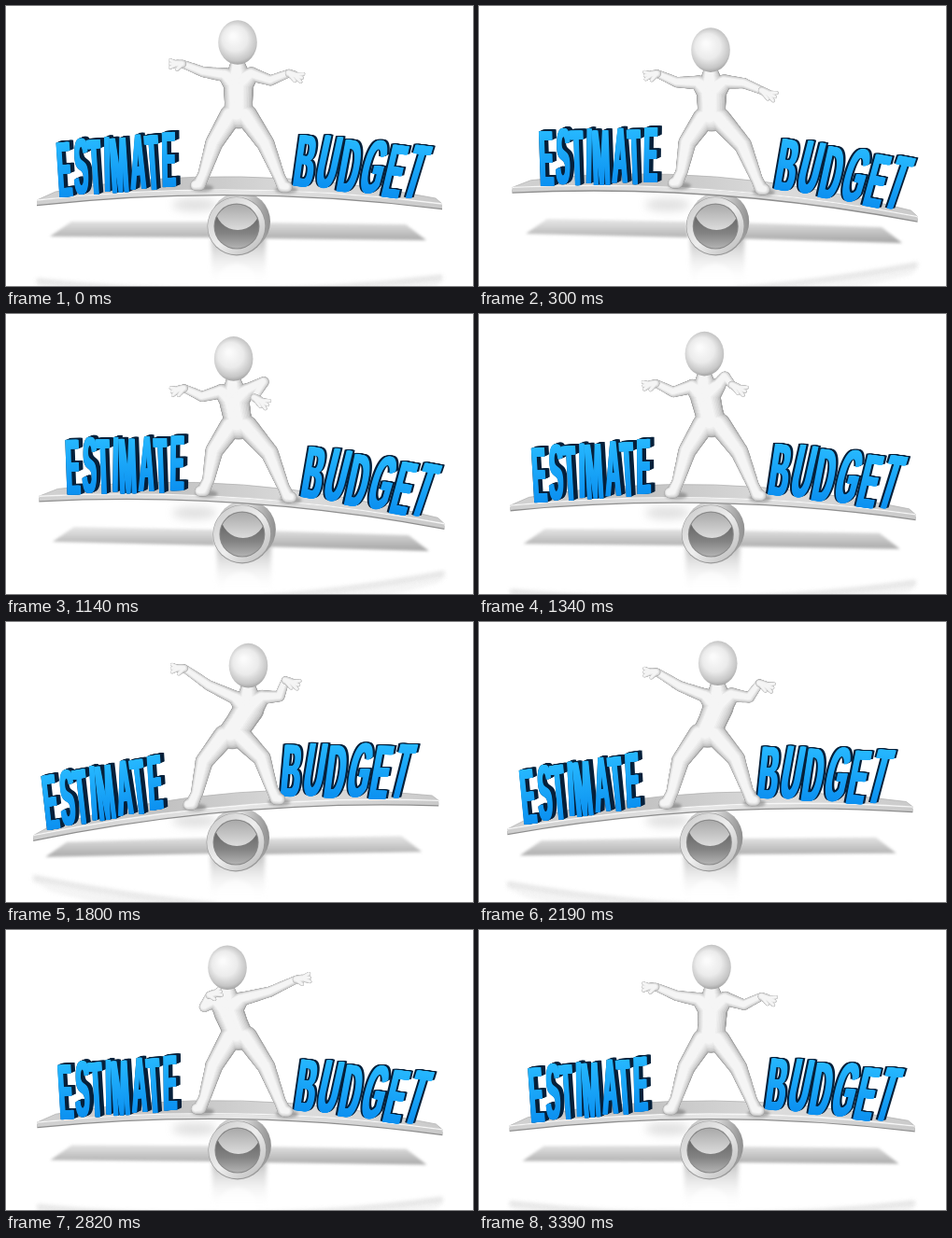
An HTML page with a canvas that plays this animation: 500x300 px, repeating every 3500 ms.

```html
<!DOCTYPE html>
<html lang="en">
<head>
<meta charset="utf-8">
<title>Estimate and budget in balance</title>
<style>
  html, body { margin: 0; width: 100%; height: 100%; overflow: hidden; background: #fff; }
  canvas { display: block; width: 500px; height: 300px; }
</style>
</head>
<body>
<canvas id="stage"></canvas>
<script>
const LOOP = 3500;
// Runs of equally long steps: [count, duration in ms].
const RUNS = [[3, 100], [4, 150], [4, 110], [1, 100], [2, 110], [1, 140], [1, 150],
  [4, 110], [2, 100], [1, 110], [3, 120], [4, 110]];
const FONT_SIZE = 100, CAP = 72;

const canvas = document.getElementById("stage");
const ctx = canvas.getContext("2d");
const ratio = window.devicePixelRatio || 1;
canvas.width = 500 * ratio;
canvas.height = 300 * ratio;

const mix = (a, b, u) => a + (b - a) * u;
const mixPoint = (p, q, u) => p.map((v, i) => mix(v, q[i], u));
const shift = ([x, y], dx, dy) => [x + dx, y + dy];

// One half sine between two times, zero elsewhere.
const wave = (t, from, to) => t > from && t < to ? Math.sin(Math.PI * (t - from) / (to - from)) : 0;

// 1 is right side down, -1 is left side down.
const tiltAt = t => wave(t, 0, 1400) - wave(t, 1400, 2390)
  + .14 * (wave(t, 2390, 2945) - wave(t, 2945, LOOP));

// Where a point of the level scene goes when the board tilts.
const sway = ([x, y], tilt, slide) => [x + slide * tilt, y + .1 * (x - 250) * tilt];

function gradient(x0, y0, x1, y1, ...colors) {
  const g = ctx.createLinearGradient(x0, y0, x1, y1);
  colors.forEach((c, i) => g.addColorStop(i / (colors.length - 1), c));
  return g;
}

function disc(x, y, rx, fill, ry = rx) {
  ctx.fillStyle = fill;
  ctx.beginPath();
  ctx.ellipse(x, y, rx, ry, 0, 0, Math.PI * 2);
  ctx.fill();
}

function polygon(points, fill) {
  ctx.fillStyle = fill;
  ctx.beginPath();
  points.forEach(p => ctx.lineTo(...p));
  ctx.closePath();
  ctx.fill();
}

function blurred(radius, paint) {
  ctx.save();
  ctx.filter = `blur(${radius * ratio}px)`;
  paint();
  ctx.restore();
}

function drawGround(tilt) {
  const dx = tilt * 5, rise = tilt * 5;
  const shade = gradient(0, 226, 0, 254, "rgba(120,120,120,.12)", "rgba(120,120,120,.68)");
  blurred(1.8, () => {
    polygon([[70 + dx, 231 - rise], [222, 231], [224, 248], [47 + dx, 247 - rise]], shade);
    polygon([[274, 232], [428 + dx, 234 + rise], [450 + dx, 251 + rise], [272, 249]], shade);
  });
  blurred(5, () => disc(202, 213, 24, "rgba(120,120,120,.22)", 7));
  // Faint reflection of the board in the floor.
  blurred(2, () => {
    ctx.globalAlpha = .2;
    ctx.translate(0, 506);
    ctx.scale(1, -1);
    drawBoard(tilt);
  });
}

function drawTube(tilt) {
  const x = 247 + (tilt > 0 ? tilt * 10 : tilt), y = 236;
  blurred(2, () => {
    ctx.fillStyle = gradient(0, 248, 0, 298, "rgba(130,130,130,.55)", "rgba(190,190,190,.25)", "rgba(255,255,255,0)");
    ctx.fillRect(x - 27, 248, 58, 50);
    disc(x, 298, 22, "rgba(255,255,255,.6)");
  });
  disc(x + 4, y - 5, 32, gradient(x - 28, 0, x + 36, 0, "#b8b8b8", "#e2e2e2", "#8f8f8f"));
  disc(x, y, 31.5, "#999");
  disc(x - .3, y - .3, 30.6, gradient(x - 25, y - 25, x + 25, y + 25, "#cfcfcf", "#eee", "#c0c0c0"));
  disc(x, y, 24.5, "#8a8a8a");
  // Dark floor inside the tube, bright far opening above it.
  ctx.save();
  ctx.beginPath();
  ctx.arc(x, y, 23.5, 0, Math.PI * 2);
  ctx.clip();
  ctx.fillStyle = gradient(0, y - 8, 0, y + 24, "#6c6c6c", "#848484", "#b4b4b4");
  ctx.fillRect(x - 25, y - 25, 50, 50);
  disc(x + 1, y - 20, 24, gradient(0, y - 24, 0, y + 4, "#a8a8a8", "#dcdcdc"));
  ctx.restore();
}

function drawBoard(tilt) {
  const place = (x, y) => sway([x, y], tilt, 4);
  const bend = (l, m, r) => m.map((v, i) => 2 * v - (l[i] + r[i]) / 2);
  const frontL = place(33, 208), frontR = place(467, 212);
  const backL = place(53, 199), backR = place(460, 206);
  const front = bend(frontL, place(250, 197), frontR);
  const back = bend(backL, place(252, 183), backR);
  const edge = dy => {
    ctx.beginPath();
    ctx.moveTo(...shift(frontL, 0, dy));
    ctx.quadraticCurveTo(...shift(front, 0, dy), ...shift(frontR, 0, dy));
  };
  const lip = (top, bottom, fill) => {
    edge(top);
    ctx.lineTo(...shift(frontR, 0, bottom));
    ctx.quadraticCurveTo(...shift(front, 0, bottom), ...shift(frontL, 0, bottom));
    ctx.fillStyle = fill;
    ctx.fill();
  };
  lip(2, 6.3, "#8e8e8e");
  lip(0, 5, gradient(34, 0, 467, 0, "#cfcfcf", "#e6e6e6", "#c9c9c9"));
  edge(0);
  ctx.lineTo(...backR);
  ctx.quadraticCurveTo(...back, ...backL);
  ctx.closePath();
  ctx.fillStyle = gradient(34, 0, 467, 0, "#d2d2d2", "#c3c3c3", "#dcdcdc", "#cacaca");
  ctx.fill();
  ctx.strokeStyle = "#b4b4b4";
  ctx.lineWidth = .8;
  ctx.stroke();
  edge(0);
  ctx.strokeStyle = "#f6f6f6";
  ctx.lineWidth = 1.3;
  ctx.stroke();
}

// Sets each letter on the slanted plane spanned by the word's four corners.
function drawWord(text, tilt, corners, depthFrom, depthTo) {
  const [bl, br, tl, tr] = corners.map((p, i) => sway(p, tilt, i < 2 ? 14 : 17));
  ctx.font = `bold ${FONT_SIZE}px "Liberation Sans", Arial, sans-serif`;
  const widths = [...text].map(c => ctx.measureText(c).width + 9);
  const total = widths.reduce((a, b) => a + b);

  const letters = (dx, dy, fill) => {
    let x = 0;
    ctx.fillStyle = fill;
    [...text].forEach((char, i) => {
      const u = x / total, v = (x + widths[i]) / total;
      const p = mixPoint(bl, br, u), q = mixPoint(bl, br, v), top = mixPoint(tl, tr, u);
      const odd = i % 2;
      ctx.save();
      ctx.translate(dx, dy + (odd ? -1 : 1));
      ctx.transform((q[0] - p[0]) / widths[i], (q[1] - p[1]) / widths[i],
        (p[0] - top[0] - 3 * odd) / CAP, (p[1] - top[1]) / CAP, p[0], p[1]);
      ctx.fillText(char, 4.5, 0);
      ctx.restore();
      x += widths[i];
    });
  };
  for (let u = 0; u <= 1; u += .2) {
    const [dx, dy] = mixPoint(depthFrom, depthTo, u);
    for (const w of [-1.1, 0, 1.1]) letters(dx + w, dy, "#06203a");
  }
  const face = gradient(0, 0, 0, CAP, "#0b8ff0", "#0b8ff0");
  face.addColorStop(0, "#0b8ff0");
  const blue = ctx.createLinearGradient(0, -CAP, 0, 0);
  blue.addColorStop(0, "#27b9ff");
  blue.addColorStop(1, "#0b90f0");
  for (const w of [-1.2, -.6, 0, .6, 1.2]) letters(w, 0, blue);
}

// Discs along a chain of [point, radius] pairs.
function chain(...nodes) {
  const discs = [];
  for (let i = 1; i < nodes.length; i++) {
    const [p, r] = nodes[i - 1], [q, s] = nodes[i];
    const count = Math.ceil(Math.hypot(q[0] - p[0], q[1] - p[1])) + 1;
    for (let k = 0; k <= count; k++) discs.push([...mixPoint(p, q, k / count), mix(r, s, k / count)]);
  }
  return discs;
}

function drawSolid(discs) {
  const layers = 8;
  for (let k = 0; k < layers; k++) {
    const u = k / (layers - 1), tone = Math.round(mix(164, 245, Math.sqrt(u)));
    for (const [x, y, r] of discs) {
      disc(x - r * .16 * u, y - r * .1 * u, r * (1 - .55 * u), `rgb(${tone},${tone},${tone})`);
    }
  }
}

// Middle joint of a limb, pushed sideways from the line between its ends.
function joint(from, to, bend) {
  const dx = to[0] - from[0], dy = to[1] - from[1], length = Math.hypot(dx, dy) || 1;
  return shift(mixPoint(from, to, .5), -dy / length * bend, dx / length * bend);
}

function elbow(shoulder, hand, side, amount) {
  const half = Math.hypot(hand[0] - shoulder[0], hand[1] - shoulder[1]) / 2;
  const slack = Math.sqrt(Math.max(25, 24 ** 2 - half ** 2));
  return joint(shoulder, hand, side * amount * slack);
}

function drawHand(wrist, tip) {
  const dx = tip[0] - wrist[0], dy = tip[1] - wrist[1];
  const palm = mixPoint(wrist, tip, .45);
  const fingers = [-.3, 0, .3].flatMap(s => chain([palm, 3.2], [shift(tip, -dy * s, dx * s), 1.9]));
  const thumb = chain([wrist, 3], [shift(palm, 0, 6), 1.9]);
  drawSolid([...chain([wrist, 4.2], [palm, 4.4]), ...fingers, ...thumb]);
}

function poseAt(t, tilt) {
  const right = Math.max(0, tilt), left = Math.max(0, -tilt);
  const reach = wave(t, 0, 1700), tuck = wave(t, 500, 1760);
  const cross = wave(t, 2300, 3250), dip = wave(t, 2200, 2800);
  const head = [
    248 + 12 * left - 7 * wave(t, 1000, 1560) - 11 * wave(t, 2500, 3140),
    39 + 13 * right + 8 * left + 2 * wave(t, 1000, 1560) - 5 * dip
  ];
  const hips = [249 - 7 * left, 116 + 5 * (left + right) - 3 * cross];
  const handL = [189 + 3 * right + 2 * left + 29 * cross, 62 + 20 * reach - 13 * left + 8 * cross + 9 * dip];
  const handR = [303 - 37 * tuck - 4 * left + 8 * cross, 72 + 30 * right - 10 * left - 22 * cross];
  return {
    head, hips, handL, handR,
    tipL: shift(handL, -13 + 26 * cross ** 4, 4 * reach + 5 * dip - 4 * cross ** 4),
    tipR: shift(handR, 14, 5 + 3 * reach - 7 * cross),
    bendR: .55 - 1.55 * reach
  };
}

function drawFigure(t, tilt) {
  const { head, hips, handL, handR, tipL, tipR, bendR } = poseAt(t, tilt);
  const neck = shift(head, 0, 24), chest = shift(head, 1, 46);
  const shoulderL = shift(head, -13, 35), shoulderR = shift(head, 15, 34);

  const leg = side => {
    const ankle = sway([252 + side * 40, 181 + side], tilt, 8);
    const toe = shift(ankle, side * 5, 11);
    const hip = shift(hips, side * 8, 1);
    const knee = joint(hip, ankle, -side * (4 + 4 * Math.abs(tilt)));
    blurred(1.5, () => disc(toe[0] + 3, toe[1] + 4, 12, "rgba(90,90,90,.45)", 4));
    return [
      ...chain([hip, 12], [knee, 9.5], [ankle, 6.5]),
      ...chain([ankle, 6.2], [toe, 7], [shift(toe, side * 4, 1), 5.8])
    ];
  };
  const arm = (shoulder, hand, side, bend) =>
    chain([shoulder, 7.5], [elbow(shoulder, hand, side, bend), 5.6], [hand, 4.2]);

  drawSolid([
    ...leg(-1), ...leg(1),
    ...chain([neck, 8], [chest, 16], [mixPoint(chest, hips, .6), 15], [hips, 15.5]),
    ...chain([shoulderL, 7.8], [chest, 15], [shoulderR, 7.8]),
    ...arm(shoulderL, handL, -1, .55), ...arm(shoulderR, handR, 1, bendR)
  ]);
  drawHand(handL, tipL);
  drawHand(handR, tipR);

  const [x, y] = head;
  const ball = ctx.createRadialGradient(x - 5, y - 7, 2, x - 1, y - 1, 25);
  ball.addColorStop(0, "#fbfbfb");
  ball.addColorStop(.5, "#ebebeb");
  ball.addColorStop(.85, "#c6c6c6");
  ball.addColorStop(1, "#a2a2a2");
  disc(x, y, 20.8, ball, 23.8);
}

function draw(t) {
  const tilt = tiltAt(t);
  ctx.setTransform(ratio, 0, 0, ratio, 0, 0);
  ctx.fillStyle = "#fff";
  ctx.fillRect(0, 0, 500, 300);
  drawGround(tilt);
  drawTube(tilt);
  drawBoard(tilt);
  drawWord("ESTIMATE", tilt, [[56, 204], [183, 194], [52, 143], [179, 133]], [0, 0], [4.5, -2]);
  drawWord("BUDGET", tilt, [[305, 191], [441, 208], [313, 134], [457, 149]], [-2, -1], [2.5, -1]);
  drawFigure(t, tilt);
}

const steps = [0];
for (const [count, duration] of RUNS) {
  for (let i = 0; i < count; i++) steps.push(steps[steps.length - 1] + duration);
}
steps.pop();

const start = performance.now();
let shown = -1;
function tick() {
  const time = (performance.now() - start) % LOOP;
  const step = steps.filter(s => s <= time).pop();
  if (step !== shown) draw(shown = step);
  requestAnimationFrame(tick);
}
tick();
</script>
</body>
</html>
```
